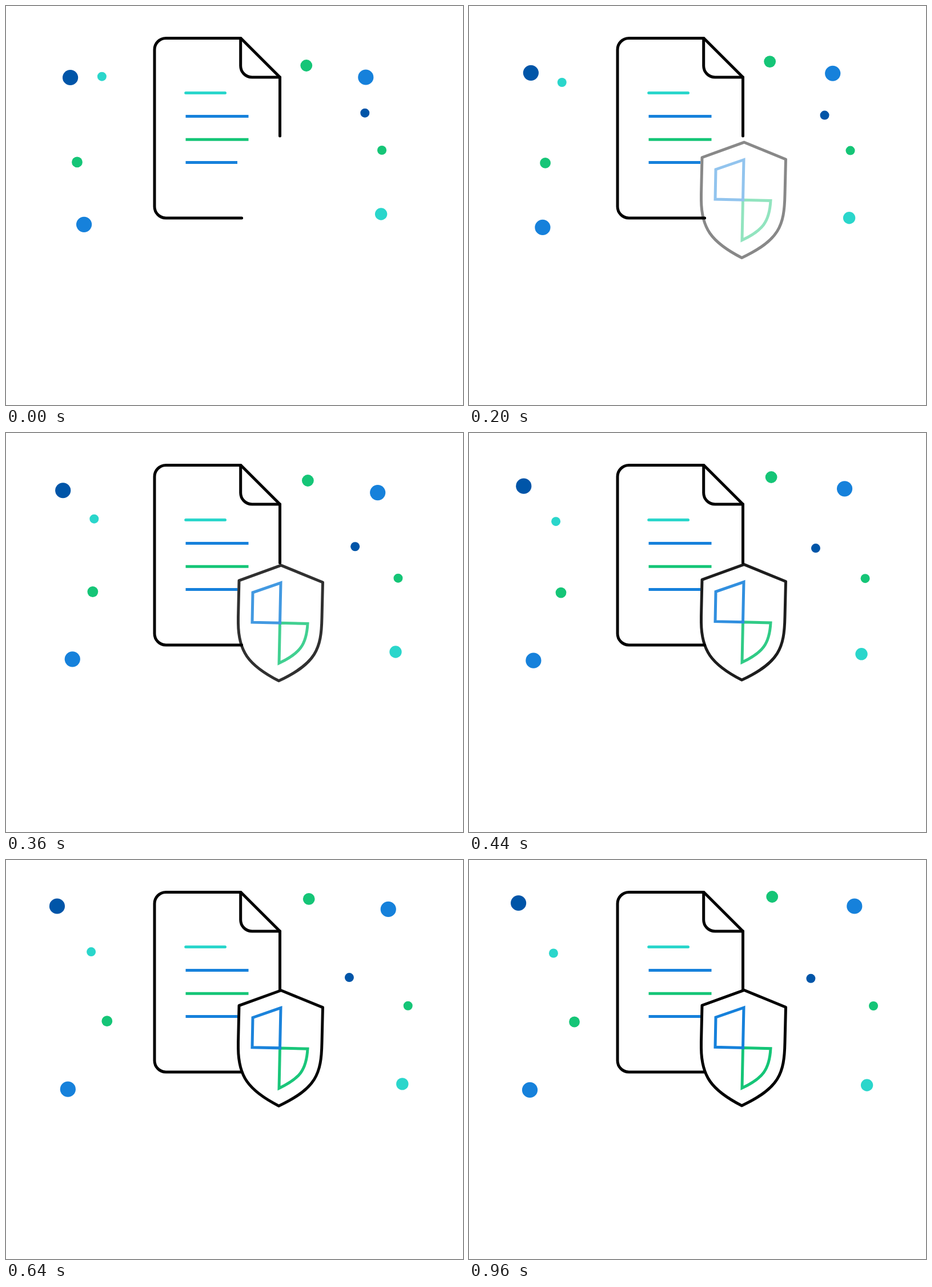
Write an HTML page that moves like this. It is 800 by 700 pixels and loops after 1 s.

```html
<!DOCTYPE html>
<html lang="en">
<head>
<meta charset="utf-8">
<title>Protected document</title>
<style>
  html, body { margin: 0; width: 100%; height: 100%; overflow: hidden; background: #fff; }
  svg { display: block; width: 100vw; height: 100vh; }
  .ink { fill: none; stroke-width: 5; }
  .round { stroke-linecap: round; stroke-linejoin: round; }
</style>
</head>
<body>
<svg viewBox="0 0 800 700">
  <g class="ink">
    <path d="M314.5 193.5H424.5M314.5 274.5H405" stroke="#1681db"/>
    <path d="M314.5 234.2H424.5" stroke="#15c577"/>
    <path class="round" d="M314.7 152.5H383.5" stroke="#2ad6cb"/>
    <g class="round" stroke="#000">
      <path d="M412.6 372H280a20 20 0 0 1-20-20V76.5a20 20 0 0 1 20-20H411L479.5 125V228"/>
      <path d="M410.7 56.5V105a20 20 0 0 0 20 20H479.5"/>
    </g>
  </g>
  <g id="shield" class="ink">
    <path class="round" stroke="#000" d="M481.5 228.3L554.5 258.2L553 320C552 375 543 400 477.5 431C423 403 407 378 406.5 330V319L408 255Z"/>
    <path stroke="#15c577" d="M479.5 329.5L528 330.7C526 368 514 383 478 400Z"/>
    <path stroke="#1681db" d="M481 259L432 276L431 328.3L479.5 329.4Z"/>
  </g>
  <g id="dots"></g>
</svg>
<script>
const LOOP = 1000, STEP = 40;
const navy = '#0055a8', blue = '#1681db', green = '#15c577', cyan = '#2ad6cb';

// radius, colour, start, end, softness of the landing
const dots = [
  [13.6, navy, 112.6, 125.5, 86.6, 75.5, .34],
  [8, cyan, 167.9, 123.7, 147.9, 163.5, .105],
  [9.4, green, 124.5, 273.9, 184.5, 284, .395],
  [13.6, blue, 136.6, 383.3, 106.5, 403.4, .11],
  [10.4, green, 525.8, 104.5, 530.7, 64.5, .3],
  [13.6, blue, 629.8, 125, 674.8, 81, .383],
  [8, navy, 628.3, 187.7, 598.4, 207.8, .24],
  [8, green, 658, 253, 708, 256, .245],
  [10.7, cyan, 656.6, 365, 696.6, 395, .163]
];

const shield = document.getElementById('shield');
const layer = document.getElementById('dots');
const circles = dots.map(([r, fill]) => {
  const c = document.createElementNS('http://www.w3.org/2000/svg', 'circle');
  c.setAttribute('r', r);
  c.setAttribute('fill', fill);
  return layer.appendChild(c);
});

// cubic-bezier(1/3, 0, x2, 1), solved by bisection
function ease(x, x2) {
  if (x >= 1) return 1;
  let lo = 0, hi = 1;
  for (let i = 0; i < 30; i++) {
    const s = (lo + hi) / 2, r = 1 - s;
    if (s * r * r + 3 * x2 * s * s * r + s * s * s < x) lo = s;
    else hi = s;
  }
  return lo * lo * (3 - 2 * lo);
}

const mix = (a, b, p) => a + (b - a) * p;

function draw(ms) {
  const t = Math.floor(ms % LOOP / STEP) * STEP;
  const shown = ease(t / 840, 0);
  shield.setAttribute('opacity', shown);
  shield.setAttribute('transform', `translate(0 ${20 * (1 - shown)})`);
  dots.forEach(([, , x0, y0, x1, y1, soft], i) => {
    const p = ease(t / 960, soft);
    circles[i].setAttribute('cx', mix(x0, x1, p));
    circles[i].setAttribute('cy', mix(y0, y1, p));
  });
}

const start = performance.now();
function tick() {
  draw(performance.now() - start);
  requestAnimationFrame(tick);
}
draw(0);
requestAnimationFrame(tick);
</script>
</body>
</html>
```
